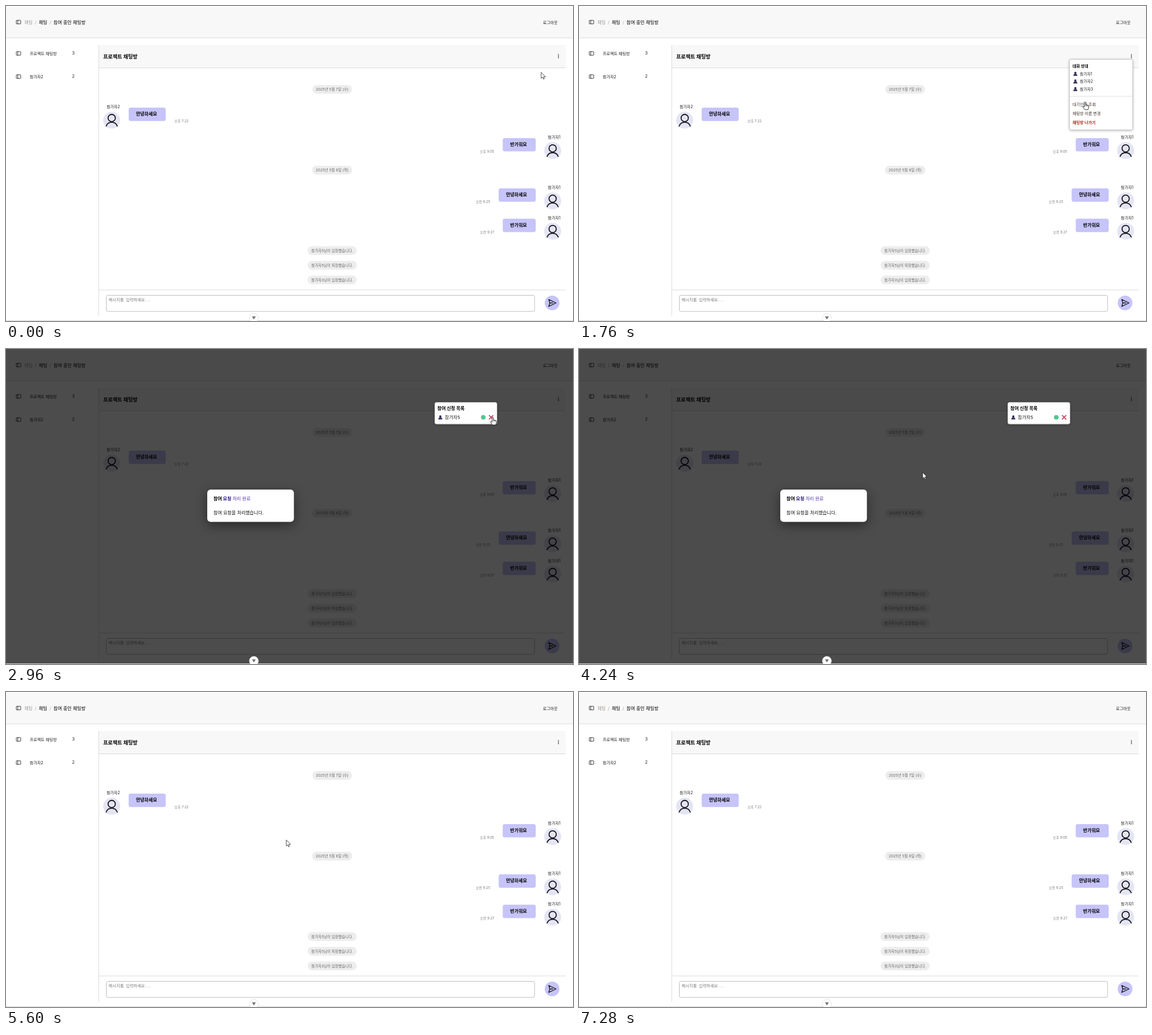
Recreate the animation shown at these times as an HTML page. Size 1003x558 px, loop 7.36 s.

```html
<!DOCTYPE html>
<html lang="ko">
<head>
<meta charset="utf-8">
<title>채팅방</title>
<style>
html, body { margin: 0; width: 100%; height: 100%; overflow: hidden; background: #fff; }
svg { display: block; font-family: Inter, "Noto Sans CJK KR", "Noto Sans CJK", sans-serif; }
.mono { font-family: "Noto Sans Mono CJK KR", "Noto Sans Mono", "Noto Sans CJK KR", monospace; }
.card { filter: drop-shadow(0 1px 2px #0004); }
.modal { filter: drop-shadow(0 6px 10px #0007); }
</style>
</head>
<body>
<svg id="stage" width="1003" height="558" viewBox="0 0 1003 558"></svg>
<script>
const LOOP = 7360, STEP = 80;
const LILAC = '#c6c4f8';

// cy is the vertical middle of the letters
const text = (x, cy, size, str, fill = '#1c1c1c', extra = '') =>
  `<text x="${x}" y="${cy + size * .37}" font-size="${size}" fill="${fill}" ${extra}>${str}</text>`;
const bold = (x, cy, size, str, fill = '#000', extra = '') =>
  text(x, cy, size, str, fill, 'font-weight="700" ' + extra);
const rect = (x, y, w, h, fill, r = 0, extra = '') =>
  `<rect x="${x}" y="${y}" width="${w}" height="${h}" rx="${r}" fill="${fill}" ${extra}/>`;
const path = (d, stroke, width, fill = 'none') =>
  `<path d="${d}" fill="${fill}" stroke="${stroke}" stroke-width="${width}" stroke-linejoin="round" stroke-linecap="round"/>`;
const circle = (x, y, r, fill, extra = '') =>
  `<circle cx="${x}" cy="${y}" r="${r}" fill="${fill}" ${extra}/>`;
const at = (x, y, body) => `<g transform="translate(${x} ${y})">${body}</g>`;
const layer = (id, body, cls = '') => `<g id="${id}" class="${cls}">${body}</g>`;
const MIDDLE = 'text-anchor="middle"';

const panelIcon = (x, y) => at(x, y,
  rect(-3.8, -3.2, 7.8, 6.4, 'none', .8, 'stroke="#222" stroke-width=".9"') + path('M-1.2 -3V3', '#222', .9));

const pill = (cy, w, str) => rect(577 - w / 2, cy - 8, w, 15.5, '#ededed', 7.75) +
  text(577, cy, 6.55, str, '#666', MIDDLE);

const avatar = (x, y, name) => text(x + 2.7, y - 23.8, 7, name, '#1c1c1c', MIDDLE) +
  at(x, y, circle(0, 0, 15, '#e4e5f4') +
    circle(0, -3.9, 6.4, 'none', 'stroke="#15151c" stroke-width="1.8"') +
    path('M-9.8 10.4A10.5 10.5 0 0 1 9.8 10.4', '#15151c', 1.8));

const bubble = (x, y, w, str) => rect(x, y, w, 23.7, LILAC, 3.5) +
  bold(x + w / 2 - 1.2, y + 11.2, 8.1, str, '#000', MIDDLE);

const sent = (y, str, w, time) => avatar(967, y, '참가자1') + bubble(937 - w, y - 22.2, w, str) +
  text(922 - w, y + 1.4, 6, time, '#777', 'text-anchor="end"');

const member = (x, y, size, name) => at(x, y,
  circle(0, -1.6, 2, '#34315c') + `<path d="M-3.5 3.7q0-3.7 3.5-3.7t3.5 3.7z" fill="#34315c"/>`) +
  text(x + 8, y, size, name);

const page =
  rect(0, 0, 1003, 558, '#fff') +
  rect(0, 2, 1003, 54, '#f8f8f8') + rect(0, 56, 1003, 1, '#dcdcdc') +
  panelIcon(22, 28.5) + text(32.5, 29, 8, '채팅', '#a39b95') + text(51, 29, 8, '/', '#aaa') +
  text(58, 29, 8.1, '채팅', '#000') + text(77, 29, 8, '/', '#aaa') +
  text(84, 29, 8.1, '참여 중인 채팅방', '#000') + text(949.7, 29.5, 7.1, '로그아웃') +
  panelIcon(22, 84) + text(42, 84.5, 7.1, '프로젝트 채팅방') + text(116.7, 83.5, 7.5, '3') +
  panelIcon(22, 125) + text(42, 125, 7.1, '참가자2') + text(116.7, 124, 7.5, '2') +
  rect(164, 69, 826, 40, '#f8f8f8') + rect(164, 109, 826, 1, '#d9d9d9') +
  rect(163.5, 69, 1, 480, '#d9d9d9') + rect(164, 502.5, 826, 1, '#d9d9d9') +
  bold(172, 89.5, 9.1, '프로젝트 채팅방') +
  [86, 88.7, 91.4].map(y => circle(977.3, y, .85, '#222')).join('') +
  pill(148, 70, '2025년 5월 7일 (수)') +
  avatar(187, 202.3, '참가자2') + bubble(217, 180.1, 65.5, '안녕하세요') + text(298, 203.6, 6, '오후 7:22', '#777') +
  sent(256.1, '반가워요', 58.3, '오후 9:05') +
  pill(291, 71, '2025년 5월 8일 (목)') +
  sent(345.2, '안녕하세요', 65.5, '오전 9:25') +
  sent(398.9, '반가워요', 58.3, '오전 9:27') +
  pill(433.5, 87, '참가자5님이 입장했습니다.') +
  pill(459.5, 87, '참가자5님이 퇴장했습니다.') +
  pill(485.5, 87, '참가자3님이 입장했습니다.') +
  rect(177.5, 512.5, 757.5, 28.5, '#fff', 3, 'stroke="#bdbdbd"') +
  text(181.5, 520.3, 7.3, '메시지를 입력하세요...', '#777', 'class="mono"') +
  circle(966, 526, 13, LILAC) +
  path('M960 519.8L973 526L960 532.2L962 526ZM962 526H967', '#111', 1.3);

const scrollButton = rect(0, 557, 1003, 1, '#d4d4d4') +
  circle(438.5, 552.5, 8, '#fff', 'stroke="#ddd" stroke-width=".8"') +
  '<path d="M435 549.7h7l-3.5 5.6z" fill="#777"/>';

const menu = rect(867.5, 94.5, 112, 125, '#fff', 3, 'stroke="#c4c4c4"') +
  bold(873, 106, 7.1, '대화 상대') +
  [1, 2, 3].map(n => member(878, 106.5 + 13.5 * n, 6.9, '참가자' + n)).join('') +
  rect(868, 159.5, 111, 1, '#ddd') +
  text(873, 174, 7.1, '대기인원 조회', '#3a2a24') +
  text(873, 190.3, 7.1, '채팅방 이름 변경', '#3a2a24') +
  bold(873, 206.7, 7.1, '채팅방 나가기', '#b02a1a');

const requests = rect(758.5, 94.5, 110, 38.5, '#fff', 3, 'stroke="#b8b8b8"') +
  bold(763, 105, 8.05, '참여 신청 목록') + member(768.3, 121, 8, '참가자5') +
  circle(844.3, 121, 4.1, 'currentColor', 'id="accept"') +
  `<g id="reject">${path('M855 117.8L861.4 124.2M861.4 117.8L855 124.2', 'currentColor', 1.9)}</g>`;

const modal = rect(356, 249, 153.3, 57.3, '#fff', 6) +
  bold(367, 265.2, 8.1, '참여 <tspan fill="#2c1a78">요청</tspan> <tspan fill="#553cb0" font-weight="500">처리 완료</tspan>') +
  text(367, 290, 8.1, '참여 요청을 처리했습니다.', '#111');

const arrow = path('M0 0V10.4L2.4 8.3L4.1 11.9L5.7 11.2L4.1 7.7H7.2Z', '#222', .8, '#fff');
const hand = path('M-1.2 8.6V1.2a1.1 1.1 0 0 1 2.2 0V5l4 .8q1.7.5 1.6 2.1l-.4 3-1 2.9H-.3L-3.7 9.5q-.7-1.3.4-1.7 1-.1 2.1 1.2Z',
  '#222', .9, '#fff') + path('M1 5V7.4M2.9 5.6V7.6M4.7 5.9V7.8', '#222', .6);

const $ = id => document.getElementById(id);
$('stage').innerHTML = layer('page', page) + layer('dim', rect(0, 0, 1003, 557, '#000', 0, 'opacity=".7"')) +
  scrollButton + layer('menu', menu, 'card') + layer('requests', requests, 'card') +
  layer('modal', modal, 'modal') + layer('cursor', layer('arrow', arrow) + layer('hand', hand));

// time, x, y of the pointer tip
const route = [
  [0, 946.7, 117.8], [400, 977, 90], [560, 979, 88.5], [1000, 979, 88.5], [1840, 893, 172], [2240, 893, 172],
  [2640, 861, 120.7], [3280, 861, 120.7], [4800, 495.8, 262.4], [6560, 495.8, 262.4], [7280, 500, 514]
];
const handTimes = [[480, 1120], [1680, 2400], [2560, 3440], [4960, 5600]];

function pointer(t) {
  const i = Math.max(1, route.findIndex(k => k[0] >= t));
  const [a, b] = [route[i - 1], route[i]];
  const u = (t - a[0]) / (b[0] - a[0]), e = u * u * (3 - 2 * u);
  return [a[1] + (b[1] - a[1]) * e, a[2] + (b[2] - a[2]) * e];
}

const show = (id, on) => $(id).style.display = on ? '' : 'none';
const within = (t, from, to) => t >= from && t < to;

function draw(now) {
  const t = Math.floor(now % LOOP / STEP) * STEP;
  const dimmed = within(t, 2960, 5600);
  const pointing = handTimes.some(([from, to]) => within(t, from, to));
  show('dim', dimmed);
  show('modal', dimmed);
  show('menu', within(t, 720, 2320));
  show('requests', within(t, 2320, 5440));
  $('accept').style.color = dimmed ? '#4fc792' : '#8dbb98';
  $('reject').style.color = dimmed ? '#cb4568' : '#c6705c';
  show('cursor', t < 7280);
  show('hand', pointing);
  show('arrow', !pointing);
  $('cursor').setAttribute('transform', `translate(${pointer(t)})`);
  requestAnimationFrame(tick);
}
const start = performance.now();
function tick() { draw(performance.now() - start); }
tick();
</script>
</body>
</html>
```
